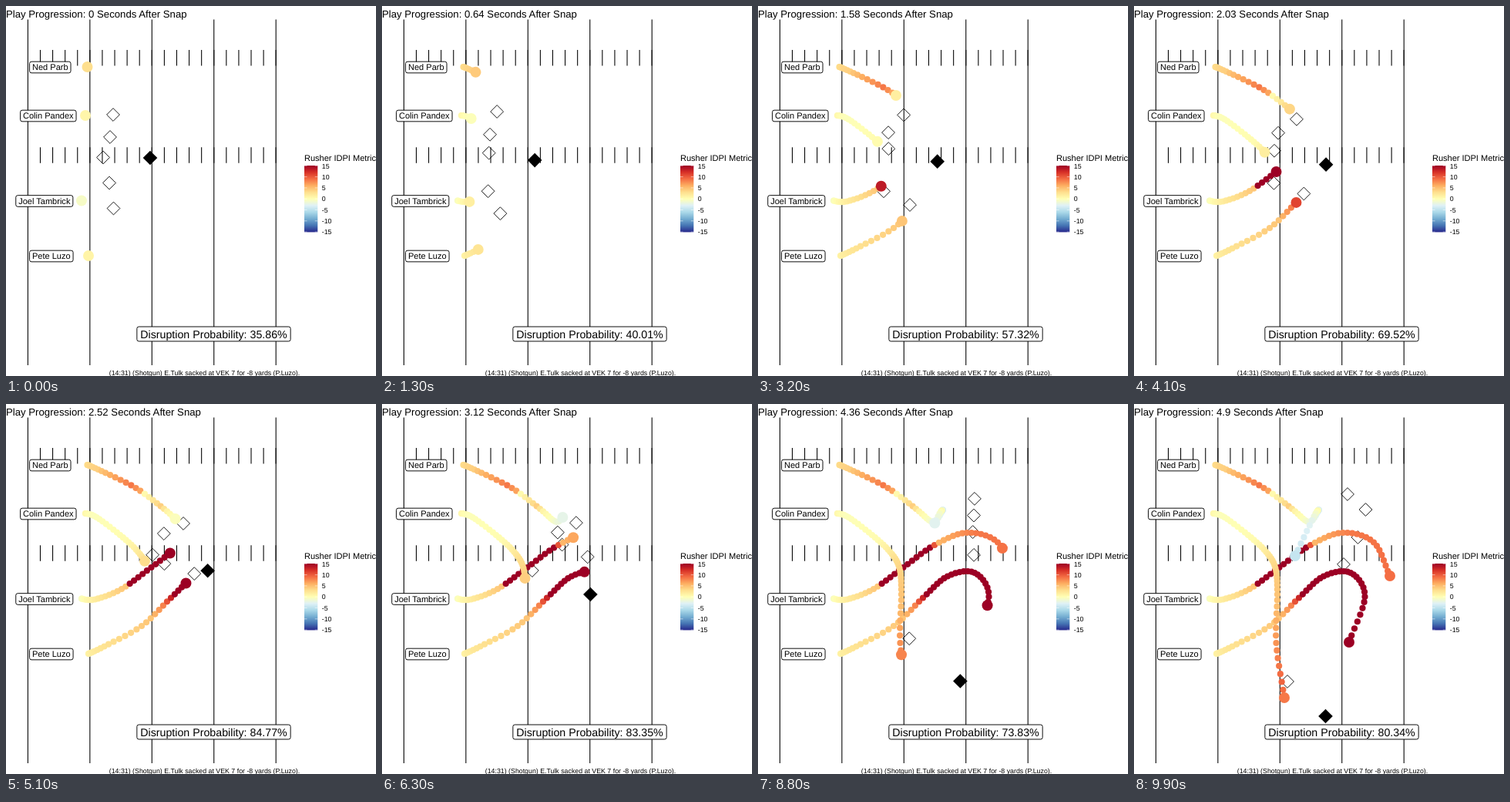
An HTML page that plays this animation: 480x480 px, repeating every 10 s.

```html
<!DOCTYPE html>
<html lang="en">
<head>
<meta charset="utf-8">
<title>Play Progression</title>
<style>
  html, body { margin: 0; width: 100%; height: 100%; overflow: hidden; background: #fff; }
  svg { display: block; width: 100vw; height: 100vh; }
  text { font-family: "Liberation Sans", Arial, sans-serif; text-rendering: geometricPrecision; }
</style>
</head>
<body>
<svg id="stage" viewBox="0 0 480 480"></svg>
<script>
const STEPS = 49, FRAMES = 100, FRAME_MS = 100;
const stage = document.getElementById('stage');

// Diverging scale, one colour every 3 units from -15 to 15
const SCALE = ['#28288c', '#4575b4', '#74add1', '#abd9e9', '#dff1f6', '#ffffb4',
  '#fedf8e', '#fdae61', '#f46d43', '#d73027', '#9c0024'];

// Routes pass through points evenly spaced in time; heat is [step, value]
const rushers = [
  { name: 'Ned Parb',
    route: [[105.5, 79], [124, 87], [168.5, 109], [205, 136], [227, 153], [239.5, 138], [233.5, 146], [209, 197]],
    heat: [[0, 3], [6, 4], [13, 8.5], [15, 6.5], [16, .5], [20, 4], [22, 1], [28, -1.5],
      [37, -4], [39, .5], [43, -2.5], [49, -4.5]] },
  { name: 'Colin Pandex',
    route: [[103, 142], [117.5, 147], [148, 170], [171.5, 192], [183.5, 213], [186, 247], [184.5, 310], [195, 381]],
    heat: [[0, .8], [6, -.3], [16, .3], [25, 3], [37, 5], [47, 9.5], [49, 8.5]] },
  { name: 'Joel Tambrick',
    route: [[98, 252.5], [115.5, 253.5], [150, 240], [188.5, 212], [229, 183], [271, 167], [311, 179.5], [332, 223]],
    heat: [[0, -.8], [15, 4.5], [16, 15], [27, 15], [29, 5.5], [37, 8.5], [49, 9]] },
  { name: 'Pete Luzo',
    route: [[107, 324], [127.5, 314.5], [176, 288], [214, 251.5], [246, 223.5], [281, 219], [299.5, 250], [279, 309]],
    heat: [[0, 1], [16, 4.6], [19, 8], [22, 15], [49, 15]] }
];
const blockers = [
  [[139, 141], [160, 136], [208, 146], [245, 157], [279.5, 129.5], [277, 117]],
  [[135, 170], [147, 165], [184.5, 164.5], [220.5, 168.5], [263, 151], [300.5, 137]],
  [[126, 196.5], [149, 187.5], [180.5, 187], [194, 208.5], [194.5, 264.5], [199, 360]],
  [[134, 229.5], [143.5, 244.5], [178.5, 232], [225.5, 188.5], [267, 164.5], [290.5, 173]],
  [[139.5, 262.5], [166.5, 270], [217, 246], [261, 203], [282.5, 190], [272, 208]]
];
const passer = [[187, 197], [208.5, 202], [247, 204.5], [268.5, 234.5], [270.5, 322.5], [248.5, 405]];
const disruption = [[0, 35.86], [6, 40.01], [16, 57.32], [25, 84.77], [37, 81.93], [44, 73.83], [49, 80.34]];

function linear(keys, k) {
  const i = Math.max(1, keys.findIndex(key => key[0] >= k));
  const [a, u] = keys[i - 1], [b, v] = keys[i];
  return u + (v - u) * (k - a) / (b - a);
}

// Cubic spline that starts from rest at the snap
function position(route, k) {
  const last = route.length - 1, p = k / STEPS * last;
  const i = Math.min(last - 1, Math.floor(p)), s = p - i, r = 1 - s;
  return [0, 1].map(axis => {
    const at = j => route[j][axis];
    const speed = j => j === 0 ? 0 : j === last ? at(j) - at(j - 1) : (at(j + 1) - at(j - 1)) / 2;
    return at(i) * (1 + 2 * s) * r * r + at(i + 1) * s * s * (3 - 2 * s)
      + s * r * (speed(i) * r - speed(i + 1) * s);
  });
}

function heatColor(value) {
  const p = (value + 15) / 3, i = Math.min(9, Math.floor(p));
  const channel = (hex, n) => parseInt(hex.slice(1 + 2 * n, 3 + 2 * n), 16);
  const mix = n => Math.round(channel(SCALE[i], n) + (channel(SCALE[i + 1], n) - channel(SCALE[i], n)) * (p - i));
  return `rgb(${mix(0)},${mix(1)},${mix(2)})`;
}

function set(el, attrs) {
  for (const name in attrs) el.setAttribute(name, attrs[name]);
  return el;
}
function add(tag, attrs, parent = stage) {
  return parent.appendChild(set(document.createElementNS('http://www.w3.org/2000/svg', tag), attrs));
}
function text(x, y, size, content, anchor = 'start') {
  const el = add('text', { x, y, 'font-size': size, 'text-anchor': anchor });
  el.textContent = content;
  return el;
}
const line = (x1, y1, x2, y2, stroke = '#000', width = 1.07) =>
  add('line', { x1, y1, x2, y2, stroke, 'stroke-width': width });
const diamond = (r, attrs) => add('path', { d: `M0 ${-r}L${r} 0L0 ${r}L${-r} 0Z`, ...attrs });

// Text in a rounded box that fits it
function label(x, y, size, content) {
  const el = text(x, y + size * .36, size, content, 'middle');
  const width = el.getComputedTextLength() + size * .62, height = size * 1.33;
  const box = add('rect', { x: x - width / 2, y: y - height / 2, width, height, rx: 2.5,
    fill: '#fff', stroke: '#000', 'stroke-width': .95 });
  stage.insertBefore(box, el);
  return el;
}

function dot(r, { route, heat }, k, el = add('circle', { r })) {
  const [cx, cy] = position(route, k);
  return set(el, { cx, cy, fill: heatColor(linear(heat, k)) });
}

// Field
for (let i = 0; i <= 20; i++) {
  const x = 28.4 + 16.09 * i;
  if (i % 5 === 0) line(x, 17.5, x, 466);
  if (i > 0) for (const y of [57, 183.3]) line(x, y, x, y + 20.5);
}

// Legend
const gradient = add('linearGradient', { id: 'heat', x1: 0, y1: 1, x2: 0, y2: 0 });
SCALE.forEach((color, i) => add('stop', { offset: i / 10, 'stop-color': color }, gradient));
text(387, 201, 11, 'Rusher IDPI Metric');
add('rect', { x: 387, y: 207, width: 17.3, height: 86.4, fill: 'url(#heat)' });
for (let v = -15; v <= 15; v += 5) {
  const y = 250.2 - v * 2.86;
  line(387, y, 390.5, y, '#fff', .5);
  line(400.8, y, 404.3, y, '#fff', .5);
  text(409.8, y + 3.2, 8.8, v);
}

// Players; later trail dots cover earlier ones
for (const { name, route: [[x, y]] } of rushers) label(x - 48.2, y + .5, 11.04, name);
const movers = blockers.map(route => ({ route, mark: diamond(8.4, { fill: 'none', stroke: '#000', 'stroke-width': .9 }) }));
movers.push({ route: passer, mark: diamond(9.3) });
const trail = [];
for (let k = 0; k < STEPS; k++) {
  for (const rusher of rushers) trail.push({ k, mark: dot(4.1, rusher, k) });
}
const heads = rushers.map(rusher => dot(7, rusher, 0));

// Titles
const title = text(0, 15, 13.2, '');
const chance = label(269.5, 425.5, 14.23, 'Disruption Probability: 00.00%');
text(381.2, 478.8, 8.8, '(14:31) (Shotgun) E.Tulk sacked at VEK 7 for -8 yards (P.Luzo).', 'end');

function render(frame) {
  const k = frame * STEPS / (FRAMES - 1);
  title.textContent = `Play Progression: ${+(k / 10).toFixed(2)} Seconds After Snap`;
  chance.textContent = `Disruption Probability: ${+linear(disruption, Math.round(k)).toFixed(2)}%`;
  for (const { route, mark } of movers) set(mark, { transform: `translate(${position(route, k)})` });
  for (const { k: born, mark } of trail) set(mark, { visibility: born < k ? 'visible' : 'hidden' });
  rushers.forEach((rusher, i) => dot(7, rusher, k, heads[i]));
}

const start = performance.now();
function tick() {
  render(Math.floor((performance.now() - start) / FRAME_MS) % FRAMES);
  requestAnimationFrame(tick);
}
tick();
</script>
</body>
</html>
```
